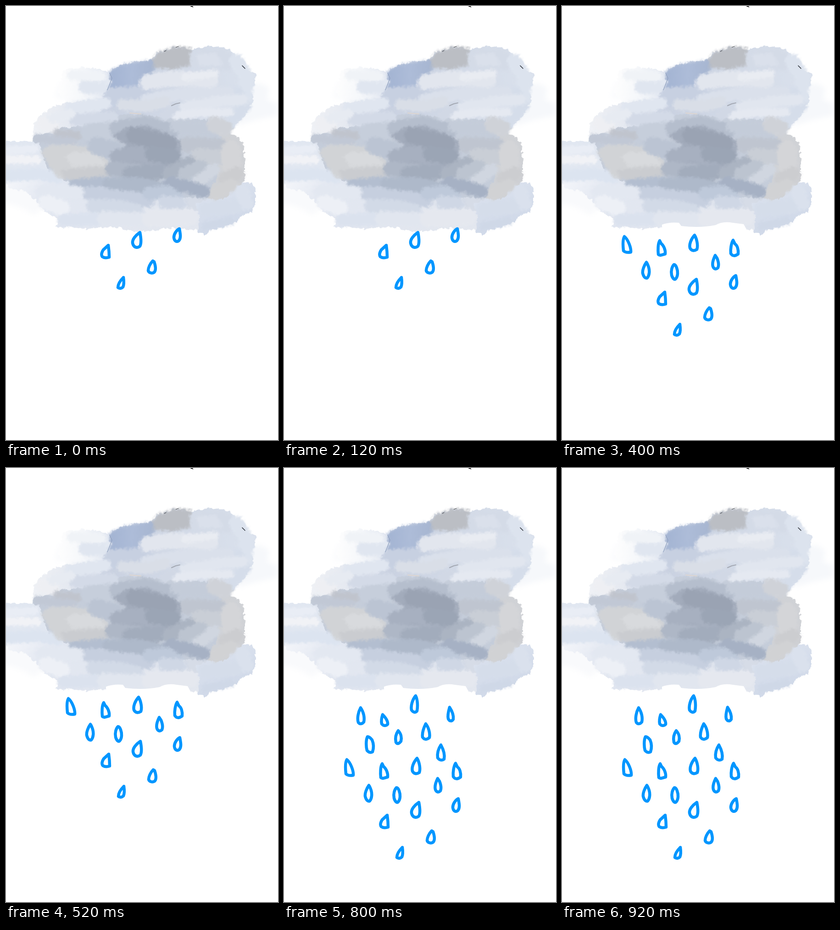
An HTML page for the animation above (1000 ms loop, 593 by 945 pixels).

```html
<!DOCTYPE html>
<html lang="en">
<head>
<meta charset="utf-8">
<title>Rain cloud</title>
<style>
html, body { margin: 0; width: 100%; height: 100%; overflow: hidden; background: #fff; }
svg { position: absolute; inset: 0; width: 100%; height: 100%; }
.brush { fill: none; stroke-linecap: round; stroke-linejoin: round; }
.rain { fill: none; stroke: #0096ff; stroke-width: 6.5; stroke-linejoin: round; animation: fall 1s step-end infinite; }
.second { animation: second 1s step-end infinite; }
.third { animation: third 1s step-end infinite; }
.fourth { animation: fourth 1s step-end infinite; }
.fifth { animation: fifth 1s step-end infinite; }
@keyframes fall {
  0% { transform: translate(0, 0); }
  20% { transform: translate(-2px, 53px); }
  40% { transform: translate(1px, 102px); }
  60% { transform: translate(4px, 175px); }
  80%, 100% { transform: translate(2px, 235px); }
}
@keyframes second { 0% { opacity: 0; } 20%, 100% { opacity: 1; } }
@keyframes third { 0% { opacity: 0; } 40%, 100% { opacity: 1; } }
@keyframes fourth { 0% { opacity: 0; } 60%, 100% { opacity: 1; } }
@keyframes fifth { 0% { opacity: 0; } 80%, 100% { opacity: 1; } }
</style>
</head>
<body>
<svg viewBox="0 0 593 945">
  <defs>
    <filter id="rough" filterUnits="userSpaceOnUse" x="-20" y="60" width="640" height="460" color-interpolation-filters="sRGB">
      <feTurbulence type="fractalNoise" baseFrequency=".13" numOctaves="2" seed="4"/>
      <feDisplacementMap in="SourceGraphic" scale="10" xChannelSelector="R" yChannelSelector="G"/>
    </filter>
    <filter id="soft" filterUnits="userSpaceOnUse" x="-20" y="60" width="640" height="460" color-interpolation-filters="sRGB">
      <feGaussianBlur stdDeviation="2.6"/>
    </filter>
    <filter id="mist" filterUnits="userSpaceOnUse" x="-60" y="60" width="720" height="460" color-interpolation-filters="sRGB">
      <feGaussianBlur stdDeviation="6"/>
    </filter>
    <linearGradient id="puff"><stop stop-color="#fefefe"/><stop offset=".45" stop-color="#f5f7fa"/><stop offset="1" stop-color="#dfe5f0"/></linearGradient>
    <linearGradient id="shoulder"><stop stop-color="#f0f2f6"/><stop offset="1" stop-color="#d3dae8"/></linearGradient>
    <linearGradient id="belly" x2="1" y2=".25"><stop stop-color="#f8f9fc"/><stop offset=".3" stop-color="#e2e7f1"/><stop offset="1" stop-color="#e3e7ef"/></linearGradient>
    <linearGradient id="corner" x2=".5" y2="1"><stop stop-color="#dfe5f0"/><stop offset="1" stop-color="#cfd8e8"/></linearGradient>
    <linearGradient id="crown"><stop stop-color="#c8d0e0"/><stop offset="1" stop-color="#dbe2ed"/></linearGradient>
    <linearGradient id="blue"><stop stop-color="#a2b3d2"/><stop offset=".5" stop-color="#adbcd8"/><stop offset="1" stop-color="#a6b5d0"/></linearGradient>
  </defs>

  <g filter="url(#mist)">
    <path fill="#f6f8fb" d="M520 175L555 168L574 180L570 205L592 212L592 238L545 248L505 260Z"/>
    <path fill="#f9fafc" d="M-10 385L70 395L85 435L62 455L35 440L10 432L-10 430Z"/>
    <path fill="#fafbfd" d="M118 165L160 172L150 205L106 200Z"/>
  </g>

  <g filter="url(#rough)">
    <path fill="url(#puff)" d="M112 186L122 165L121 148L133 136L165 133L200 137L222 144L235 165L230 195L236 240L130 235L128 205Z"/>
    <path fill="url(#shoulder)" d="M60 270L62 252L82 232L104 218L140 210L240 200L270 300L120 320L60 300L57 286Z"/>
    <path fill="#e1e7f1" d="M-20 296L30 294L80 297L140 310L140 390L70 388L30 392L-20 380Z"/>
    <path fill="url(#belly)" d="M-10 368L60 378L150 375L395 400L426 440L422 486L398 487L366 484L340 484L318 489L288 492L262 486L232 481L200 482L175 486L150 481L106 482L116 465L84 446L66 424L40 402L10 398Z"/>
    <path fill="#d6dce7" d="M385 395L440 400L490 405L480 432L425 450L395 440Z"/>
    <path fill="url(#corner)" d="M412 430L470 412L512 384L537 385L544 398L544 428L536 449L514 455L500 472L470 482L445 489L434 498L420 494L418 480L423 460Z"/>
    <path fill="url(#crown)" d="M215 190L230 170L225 150L232 138L256 126L292 120L320 116L326 102L346 96L372 89L404 94L440 88L472 89L496 102L514 128L530 141L546 148L541 172L532 182L541 204L529 226L516 244L500 260L486 278L500 300L300 300L200 260Z"/>
    <path fill="#d0d2d6" d="M430 285L484 276L505 286L517 301L521 340L521 378L512 388L490 400L482 417L462 421L438 418L410 380Z"/>
    <path fill="#c5cdda" d="M58 296L60 282L84 278L115 266L170 260L260 235L440 248L470 285L460 370L440 417L330 418L230 390L130 382L92 360L78 318L74 298Z"/>

    <g filter="url(#soft)">
      <path fill="url(#blue)" d="M224 142L258 126L320 116L326 140L296 160L288 178L222 185L230 165Z"/>
      <path fill="#bbbec4" d="M320 118L328 102L350 94L374 88L404 92L402 130L360 138L322 134Z"/>
      <path fill="#d4dbe7" d="M400 105L430 92L474 92L494 105L488 140L402 134Z"/>
      <path fill="#dce2ed" d="M415 106L458 102L475 130L420 130Z" opacity=".8"/>
      <g class="brush">
        <path stroke="#dce3ee" stroke-width="32" d="M502 120L525 155L520 205"/>
        <path stroke="#d5ddea" stroke-width="24" d="M505 188L522 218L487 257"/>
        <path stroke="#c7d0e1" stroke-width="42" d="M235 198L300 195"/>
        <path stroke="#e2e6ee" stroke-width="34" d="M308 166L360 158L447 160"/>
        <path stroke="#e9ecf2" stroke-width="17" d="M390 155L455 147"/>
        <path stroke="#dae0eb" stroke-width="28" d="M306 205L380 192L485 190"/>
        <path stroke="#d9dee7" stroke-width="25" d="M254 215L310 218L346 208"/>
        <path stroke="#e1e6ef" stroke-width="24" d="M390 220L470 207L516 204"/>
        <path stroke="#e5e9f1" stroke-width="19" d="M370 238L420 233L488 231"/>
        <path stroke="#d1d8e5" stroke-width="20" d="M345 240L362 228"/>
        <path stroke="#e0e6f0" stroke-width="32" d="M174 175L206 176"/>
        <path stroke="#f0f3f7" stroke-width="22" d="M144 150L206 154"/>
        <path stroke="#e0e6f0" stroke-width="26" d="M142 223L216 212"/>
        <path stroke="#d3dae7" stroke-width="28" d="M152 248L230 243"/>
        <path stroke="#eeeff3" stroke-width="28" d="M82 256L102 264"/>
        <path stroke="#e7ebf2" stroke-width="22" d="M102 244L140 235"/>
        <path stroke="#c0c4cd" stroke-width="18" d="M112 276L155 282"/>
        <path stroke="#c1c8d5" stroke-width="18" d="M68 288L145 296"/>
        <path stroke="#f1f2f6" stroke-width="18" d="M-10 334L68 335"/>
        <path stroke="#e9edf5" stroke-width="18" d="M-10 316L62 311"/>
        <path stroke="#dce4f0" stroke-width="26" d="M-10 371L70 366L112 373"/>
      </g>

      <path fill="#d1d3d6" d="M76 318L92 304L150 301L212 318L226 345L220 374L155 381L112 374L96 350Z"/>
      <path fill="#d8dadd" d="M128 328L150 317L204 321L216 346L145 349Z"/>
      <path fill="#c8cace" d="M118 357L214 350L230 365L210 378L130 378Z" opacity=".75"/>
      <g class="brush">
        <path stroke="#c6cedb" stroke-width="38" d="M184 275L236 270"/>
        <path stroke="#bbc4d3" stroke-width="40" d="M198 305L240 316"/>
        <path stroke="#b5becd" stroke-width="34" d="M242 268L300 256L360 272"/>
        <path stroke="#c4ccd9" stroke-width="24" d="M370 262L458 270"/>
        <path stroke="#cfd2d8" stroke-width="36" d="M455 258L476 266"/>
        <path stroke="#bfc5d0" stroke-width="34" d="M394 302L468 306"/>
        <path stroke="#c9ced6" stroke-width="34" d="M420 326L475 330"/>
      </g>
      <path fill="#a2abbb" d="M231 284L260 265L305 260L350 276L378 292L383 330L366 358L335 368L260 350L235 325L262 302Z"/>
      <g class="brush">
        <path stroke="#9aa3b3" stroke-width="36" d="M280 282L330 294L356 300"/>
        <path stroke="#a7b0c0" stroke-width="32" d="M242 328L290 320L325 338"/>
        <path stroke="#9ba5b5" stroke-width="34" d="M320 322L363 328"/>
        <path stroke="#aeb7c6" stroke-width="32" d="M232 355L290 359"/>
        <path stroke="#a2acbc" stroke-width="34" d="M270 367L330 362"/>
        <path stroke="#abb4c2" stroke-width="30" d="M355 364L400 342"/>
        <path stroke="#bcc4d0" stroke-width="30" d="M390 365L425 350"/>
        <path stroke="#d0d6e0" stroke-width="26" d="M420 382L454 355"/>
        <path stroke="#d4d5d8" stroke-width="42" d="M490 314L492 350"/>
        <path stroke="#cccdd0" stroke-width="32" d="M480 376L504 366"/>
        <path stroke="#d1d2d4" stroke-width="28" d="M456 408L490 390"/>
        <path stroke="#b3bed0" stroke-width="22" d="M148 389L215 382L300 400"/>
        <path stroke="#aeb9ca" stroke-width="36" d="M228 391L290 391L344 402"/>
        <path stroke="#a6b1c4" stroke-width="28" d="M357 386L400 394L430 404"/>
        <path stroke="#c6cfdf" stroke-width="30" d="M180 407L260 417L310 424"/>
        <path stroke="#bec9da" stroke-width="28" d="M312 408L350 404L374 418"/>
        <path stroke="#d2dae7" stroke-width="30" d="M190 435L245 436L285 446"/>
        <path stroke="#cfd7e5" stroke-width="28" d="M345 427L380 430"/>
        <path stroke="#e3e8f1" stroke-width="30" d="M80 403L155 406"/>
        <path stroke="#edf0f6" stroke-width="34" d="M88 428L122 440"/>
        <path stroke="#dbe2ee" stroke-width="28" d="M126 466L200 464"/>
        <path stroke="#e1e6ef" stroke-width="32" d="M214 462L310 466"/>
        <path stroke="#e5e8ef" stroke-width="38" d="M315 462L400 460"/>
        <path stroke="#d5ddea" stroke-width="32" d="M436 442L505 435"/>
        <path stroke="#dae1ed" stroke-width="30" d="M515 405L525 430"/>
        <path stroke="#cfd8e7" stroke-width="18" d="M434 480L490 468"/>
      </g>
    </g>
  </g>

  <g class="brush" stroke="#30343c">
    <path d="M515 130L521 136" stroke-width="1.6"/>
    <path d="M345 99L349 97M370 90L376 88" stroke-width="1"/>
    <path d="M361 217L370 213L379 211" stroke="#a4a9b3" stroke-width="2"/>
    <path d="M226 146L231 157L221 183" stroke="#8e9fbe" stroke-width="1.2"/>
    <path d="M270 233L294 235" stroke="#ddd5cf" stroke-width="2"/>
  </g>
  <path d="M401 0H406L409 3Q404 2 401 0Z"/>
</svg>

<svg viewBox="0 0 593 945">
  <path class="second" fill="#fff" d="M218 498V476Q235 470 255 472L260 479Q300 484 335 477Q350 468 372 472L396 475L402 486L400 498Z"/>
  <g class="rain">
    <path d="M223 521L212 531Q206 541 210 546Q216 550 225 547Q225 535 223 521Z"/>
    <path d="M292 493C283 499 275 508 276 516C278 526 286 528 292 523C296 516 294 503 292 493Z"/>
    <path d="M378 485C372 488 366 496 366 504C367 512 372 515 377 511C382 505 380 496 378 485Z"/>
    <path d="M320 555C314 561 310 570 310 576C311 581 318 583 323 580C328 575 326 566 323 557Z"/>
    <path d="M256 591C250 597 244 606 244 613C247 616 252 615 255 612C258 606 257 598 256 591Z"/>
    <g class="second"><g transform="translate(2 -53)">
      <path d="M181 509C176 516 172 526 173 533C175 541 179 545 183 543C188 537 188 527 186 520C184 514 183 511 181 509Z"/>
      <path d="M241 514C237 518 234 527 236 537C238 544 242 548 245 545C250 539 250 529 247 521C245 515 243 514 241 514Z"/>
      <path d="M331 494C327 502 324 511 326 518C328 524 333 525 337 521C340 514 337 505 335 500Z"/>
    </g></g>
    <g class="third"><g transform="translate(-1 -102)">
      <path d="M136 502C132 508 133 524 134 533C138 537 144 537 150 536C151 527 144 508 136 502Z"/>
      <path d="M213 511C209 517 209 532 210 541C214 545 219 541 225 540C226 530 221 521 216 517Z"/>
      <path d="M289 499C281 508 277 519 279 527C282 533 288 534 294 530C297 522 294 507 289 499Z"/>
      <path d="M373 510C369 516 367 530 368 539C372 545 377 545 384 540C385 530 382 521 377 518Z"/>
    </g></g>
    <g class="fourth"><g transform="translate(-4 -175)">
      <path d="M184 525C180 533 181 548 183 555C187 560 192 560 195 558C198 549 197 539 194 532C190 527 187 525 184 525Z"/>
      <path d="M251 512C246 519 244 528 246 537C249 542 253 540 257 535C259 527 257 518 251 512Z"/>
      <path d="M311 497C306 507 303 518 304 526C308 532 313 532 319 527C321 518 317 504 311 497Z"/>
      <path d="M344 543C338 552 336 563 337 571C341 577 347 577 351 574C353 564 349 552 344 543Z"/>
    </g></g>
    <g class="fifth"><g transform="translate(-2 -235)">
      <path d="M167 522C162 531 159 545 162 554C165 558 170 558 174 553C176 544 174 532 167 522Z"/>
      <path d="M215 537C213 543 212 552 213 557C217 562 222 562 226 558C227 551 222 544 215 537Z"/>
      <path d="M287 496C280 504 276 518 278 527C282 533 287 533 290 529C292 518 291 503 287 496Z"/>
      <path d="M361 521C359 528 356 538 358 546C361 552 366 552 369 547C370 539 367 530 361 521Z"/>
    </g></g>
  </g>
</svg>
</body>
</html>
```
